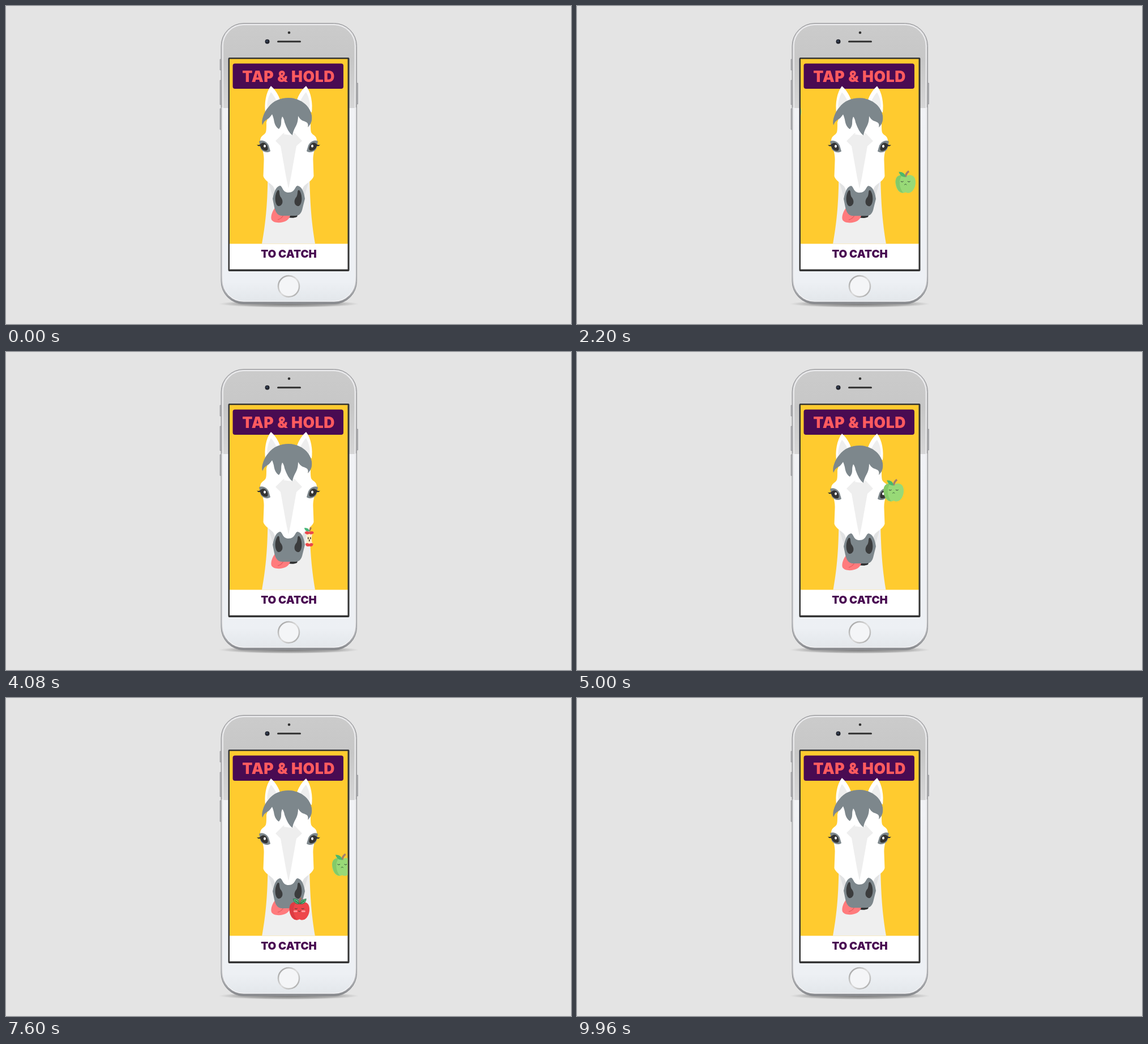
An HTML page that plays this animation: 998 px wide and 561 px high, repeating every 10000 ms.

```html
<!DOCTYPE html>
<html lang="en">
<head>
<meta charset="utf-8">
<title>Tap &amp; hold</title>
<style>
  html, body { margin: 0; width: 100%; height: 100%; overflow: hidden; background: #e4e4e4; }
  svg { display: block; width: 998px; height: 561px; }
  text { font-family: Inter, sans-serif; font-weight: 900; text-anchor: middle; }
</style>
</head>
<body>
<svg viewBox="0 0 998 561">
  <defs>
    <linearGradient id="metal" x2="0" y2="1">
      <stop offset="0" stop-color="#d4d4d6"/><stop offset=".3" stop-color="#bebec0"/>
      <stop offset=".3" stop-color="#dcdde0"/><stop offset=".9" stop-color="#d2d4d8"/><stop offset="1" stop-color="#86888c"/>
    </linearGradient>
    <linearGradient id="face" x2="0" y2="1">
      <stop offset="0" stop-color="#cbcbcb"/><stop offset=".13" stop-color="#c7c7c7"/><stop offset=".302" stop-color="#d6d6d7"/>
      <stop offset=".302" stop-color="#f1f2f5"/><stop offset=".93" stop-color="#edf0f4"/><stop offset="1" stop-color="#e3e7eb"/>
    </linearGradient>
    <linearGradient id="ring" x2="1" y2="1">
      <stop offset="0" stop-color="#999"/><stop offset=".5" stop-color="#ddd"/><stop offset="1" stop-color="#a5a5a5"/>
    </linearGradient>
    <radialGradient id="shade">
      <stop offset="0" stop-color="#666" stop-opacity=".9"/><stop offset=".7" stop-color="#777" stop-opacity=".5"/><stop offset="1" stop-color="#888" stop-opacity="0"/>
    </radialGradient>
    <clipPath id="play"><path d="M395 94H603.5V419.5H395Z"/></clipPath>

    <g id="halfHead">
      <path fill="#fff" d="M468 141C459 152 456 172 458 188L485 168C481 156 475 147 468 141Z"/>
      <path fill="#eee" d="M468 152C463 160 460 172 462 181L478 168C475 161 472 156 468 152Z"/>
      <path fill="#fff" d="M500 170L468 182L460 205C460 222 460 224 454 228C448 232 448 239 451 246C454 256 456 264 455.5 273L454.5 300C456 307 467 313 472 318L481 334H500Z"/>
    </g>
    <g id="eye">
      <path fill="#7d878c" d="M447 238.5C453 235 461 239 464 246L467 256C462 260 454 258 450 252Z"/>
      <path fill="#333" d="M443 244.5Q448 246 450 243C455 239 460 242 462 248C464 254 461 256 457 255C452 254 450 250 449 247Q445 248 443 244.5Z"/>
      <ellipse cx="457" cy="247" rx="2" ry="2.6" fill="#fff"/>
    </g>
    <path id="nostril" fill="#3b3c3d" d="M480 325C485 323 481 333 486 338C491 345 488 353 481 353C474 350 474 332 480 325Z"/>

    <path id="eyes" fill="none" stroke="#37403b" stroke-linecap="round" d="M-8-1q2 2 4 0M4-1q2 2 4 0"/>
    <path id="body" d="M0-10C6-14 15-13 17-5C20 5 14 18 7 19Q3 20 0 18Q-3 20-7 19C-14 18-20 5-17-5C-15-13-6-14 0-10Z"/>
    <path id="side" d="M-6-12C-16-13-19-4-17 3C-15 14-10 19-4 19C-11 11-13-3-6-12Z"/>
    <g id="red">
      <use href="#body" fill="#ee464a"/>
      <use href="#side" fill="#dc3c43"/>
      <path d="M0-10Q0-16 3-20" fill="none" stroke="#a5705a" stroke-width="3"/>
      <path fill="#50bd7d" stroke="#24523b" stroke-width=".7" d="M0-9Q-9-8-11-18Q-1-19 0-9ZM1-9Q2-17 12-18Q11-8 1-9Z"/>
      <path d="M-8-15L-1-10M9-15L2-10" stroke="#24352c"/>
      <use href="#eyes"/>
      <path d="M-2 3q2 3 4 0" fill="none" stroke="#37403b"/>
      <path d="M-9 4h4M5 4h4" stroke="#ff9ca0" stroke-width="3" stroke-linecap="round"/>
    </g>
    <g id="green">
      <use href="#body" fill="#98d977"/>
      <use href="#side" fill="#83ca69"/>
      <path d="M0-9Q1-16 6-19" fill="none" stroke="#a5806a" stroke-width="3.5"/>
      <path fill="#4db86b" d="M0-9Q-9-8-12-18Q-1-18 0-9Z"/>
      <use href="#eyes"/>
      <path d="M-2 5q2-3 4 0" fill="none" stroke="#37603b"/>
    </g>
    <g id="core">
      <path d="M0-10L3-17" stroke="#9d7058" stroke-width="2.5"/>
      <path fill="#45b678" d="M0-10Q-7-9-9-16Q-1-17 0-10Z"/>
      <path fill="#fdf0c5" d="M-6-7H6Q2 2 6 13H-6Q-2 2-6-7Z"/>
      <path fill="#ec464a" d="M-8-7Q-7-12 0-9Q7-12 8-7Q3-3 0-6Q-4-3-8-7ZM-7 12Q-4 9 0 12Q4 9 7 12Q6 18 0 16Q-6 18-7 12Z"/>
      <path d="M-2 1v2M2 1v2M0 5v2" stroke="#4a352b" stroke-width="1.7" stroke-linecap="round"/>
    </g>
  </defs>

  <ellipse cx="499.5" cy="525.5" rx="124" ry="6.5" fill="url(#shade)"/>
  <path fill="#b5b6b9" stroke="#8e8f92" stroke-width=".7" d="M378 94h3v19h-3zM378 131h3v43h-3zM378 181h3v37h-3zM618.5 136h3v37h-3z"/>
  <rect x="380" y="30.5" width="239.5" height="495" rx="40" fill="url(#metal)" stroke="#8b8c8f"/>
  <rect x="383" y="33" width="233.5" height="488" rx="37" fill="url(#face)" stroke="#f0f0f2" stroke-width="1.6"/>
  <circle cx="500" cy="47" r="2.3" fill="#333"/>
  <circle cx="461.5" cy="62.7" r="4" fill="#22252e"/>
  <circle cx="461" cy="62" r="1.4" fill="#40516b"/>
  <rect x="479" y="61.3" width="42" height="3" rx="1.5" fill="#303030"/>
  <circle cx="499.5" cy="494.5" r="18.5" fill="#f4f5f7" stroke="url(#ring)" stroke-width="2.5"/>
  <rect x="392.5" y="91" width="214" height="377" rx="2" fill="#343434"/>
  <path fill="#ffcb2f" d="M395 93.5H603.5V420H395Z"/>
  <path fill="#fff" d="M395 419.5H603.5V464.5H395Z"/>
  <rect x="400.5" y="101.5" width="195.5" height="44.5" rx="4" fill="#490b52"/>
  <text x="499.2" y="134" font-size="26.5" letter-spacing=".6" fill="#ff5a5f">TAP &amp; HOLD</text>
  <text x="499.5" y="443.5" font-size="19" fill="#490b52">TO CATCH</text>

  <g clip-path="url(#play)">
    <g id="horse">
      <path fill="#efefef" d="M462.5 295C462 345 459.5 380 451 425H547C539 380 537 345 536 295Z"/>
      <path fill="#e2e3e4" d="M463 309L472 318L475 326L471 336ZM535 309L526 318L523 326L527 336Z"/>
      <use href="#halfHead"/>
      <use href="#halfHead" transform="matrix(-1 0 0 1 998 0)"/>
      <path fill="#eee" d="M490 224L476 238L485 247L495 303L499 322L503 303L513 247L523 238L510 224Z"/>
      <path fill="#fff" d="M490 226L499 219L509 226L504 228Z"/>
      <path fill="#7d878c" d="M499 162C519 162 537 175 540 193C541 203 539 208 533 214C535 206 531 205 526 203C520 201 518 197 516 194C516 212 508 214 506 228C500 224 496 216 492 205C491 200 490 197 488 195C484 203 489 209 482 217C476 213 474 207 473 200C472 196 471 193 470 191C467 195 464 199 461 200C455 204 455 206 453 210C450 203 456 186 463 179C472 167 485 162 499 162Z"/>
      <use href="#eye"/>
      <use href="#eye" transform="matrix(-1 0 0 1 998 0)"/>
      <path fill="#303132" d="M496 368L516 366L514 372Q507 375 498 373Z"/>
      <path fill="#ff7b7d" d="M477 354C470 361 467 372 469 377C473 384 488 383 495 379C500 376 503 370 502 367L488 366Z"/>
      <path fill="none" stroke="#e75f63" stroke-width="1.5" d="M490 369Q487 375 480 377"/>
      <path fill="#7d878c" d="M484 317C478 318 474 325 471 340L474 355C476 364 480 370 488 370H511C518 370 522 366 524 356L528 340C526 325 521 318 515 317C510 318 511 329 499 329C488 329 489 318 484 317Z"/>
      <use href="#nostril"/>
      <use href="#nostril" transform="matrix(-1 0 0 1 998 0)"/>
    </g>
    <g id="fruit"></g>
  </g>
</svg>
<script>
  const LOOP = 10000, BOB = 2000, GRAVITY = 900, DRIFT = -230, PEAK = 140;
  const horse = document.getElementById('horse');
  const fruit = document.getElementById('fruit');

  // kind, time (ms), and the place passed on the way up at that time
  const throws = [
    ['red', 250, 540, 372], ['green', 230, 590, 350],
    ['core', 1240, 553, 408], ['red', 1240, 496.5, 323], ['green', 1240, 599.5, 326],
    ['green', 2150, 592, 340],
    ['core', 3160, 476, 368, -8], ['green', 3160, 546, 343], ['green', 3160, 580, 297],
    ['core', 4080, 536, 327], ['green', 4850, 594, 320],
    ['core', 5920, 518, 323], ['red', 5920, 518.5, 410], ['green', 6550, 592, 330],
    ['green', 7600, 594, 295], ['red', 7600, 518.5, 373], ['core', 8400, 568, 368]
  ].map(([kind, at, x, y, tilt = 0]) => {
    const el = document.createElementNS('http://www.w3.org/2000/svg', 'use');
    el.setAttribute('href', '#' + kind);
    fruit.append(el);
    return { el, at, x, y, tilt, rise: Math.sqrt(2 * GRAVITY * (y - PEAK)) };
  });

  function draw(now) {
    const t = now % LOOP;
    horse.setAttribute('transform', `translate(0 ${1.5 * (1 - Math.cos(2 * Math.PI * t / BOB))})`);
    for (const { el, at, x, y, tilt, rise } of throws) {
      const s = (t - at) / 1000;
      const px = x + DRIFT * s, py = y - rise * s + GRAVITY / 2 * s * s;
      el.setAttribute('transform', `translate(${px} ${py}) rotate(${tilt})`);
    }
    requestAnimationFrame(draw);
  }
  requestAnimationFrame(draw);
</script>
</body>
</html>
```
